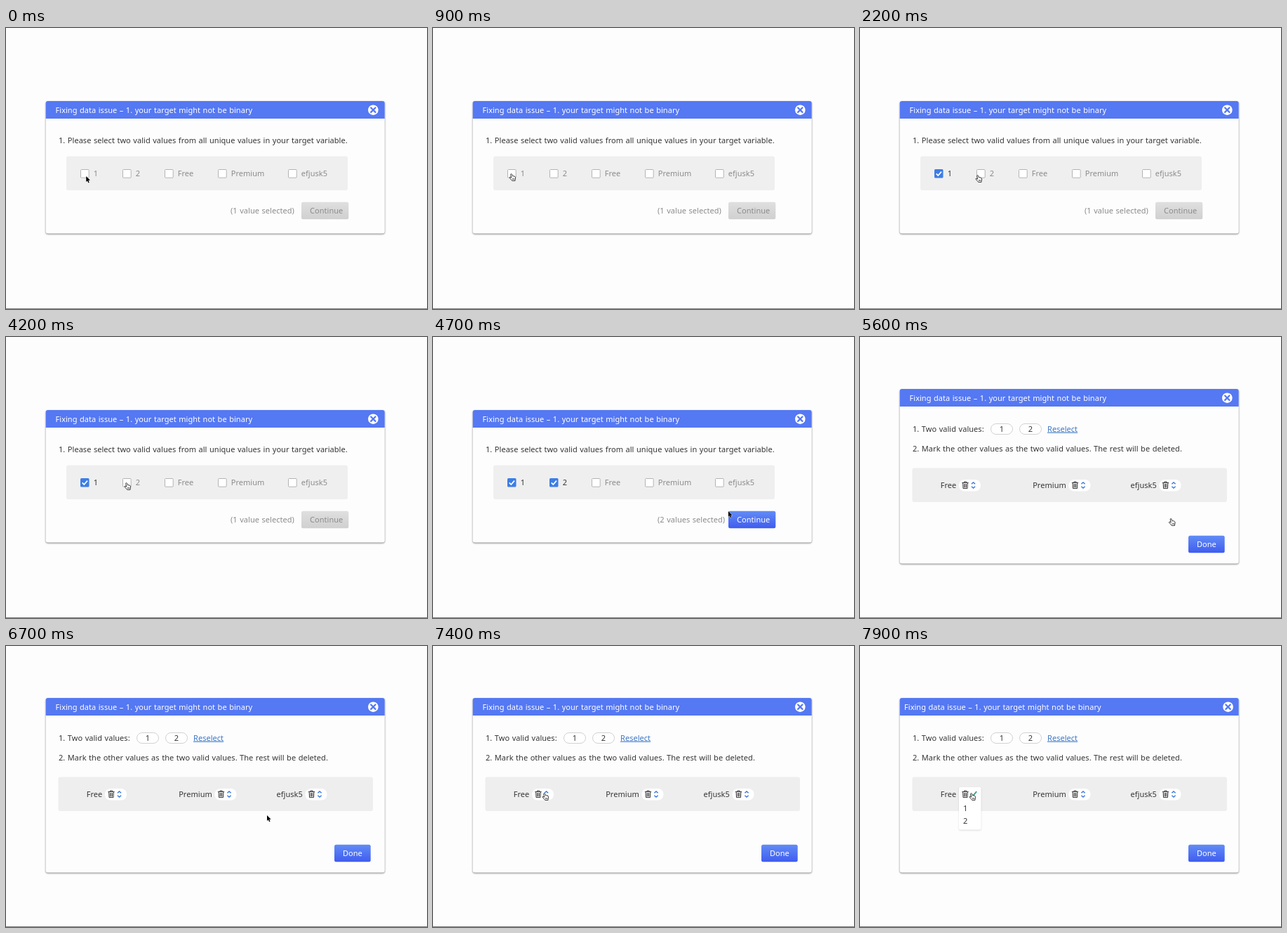
Animation, 600 px wide and 400 px high, one loop 8 s. Source, as an HTML page:

```html
<!DOCTYPE html>
<html lang="en">
<head>
<meta charset="utf-8">
<title>Fixing a data issue</title>
<style>
  html, body { margin: 0; width: 100%; height: 100%; overflow: hidden; background: #fdfdfd; }
  svg { display: block; width: 600px; height: 400px; }
  text { font: 11px "Noto Sans", "Open Sans", sans-serif; letter-spacing: .04px; word-spacing: .6px; white-space: pre; }
  .shadow { filter: drop-shadow(0 1px 1.2px rgba(0, 0, 0, .5)); }
  .soft { filter: drop-shadow(0 1px 1px rgba(0, 0, 0, .14)); }
</style>
</head>
<body>
<svg viewBox="0 0 600 400">
  <defs>
    <linearGradient id="active" x2="0" y2="1">
      <stop stop-color="#628cf6"/><stop offset="1" stop-color="#3f5cef"/>
    </linearGradient>
    <linearGradient id="disabled" x2="0" y2="1">
      <stop stop-color="#dfdfdf"/><stop offset="1" stop-color="#d0d0d0"/>
    </linearGradient>
    <g id="trash" fill="none" stroke="#3a3a3a">
      <path d="M-4.6 -3.5H4.6M-1.6 -3.7V-5H1.6V-3.7M-3.4 -3.3L-3 4.6H3L3.4 -3.3"/>
      <path d="M-1.5 -2V3.4M0 -2V3.4M1.5 -2V3.4" stroke-width=".9"/>
    </g>
    <path id="chevrons" d="M-2.6 -1.7L0 -4L2.6 -1.7M-2.6 1.7L0 4L2.6 1.7" fill="none" stroke="#3b78e0" stroke-width="1.4"/>
    <path id="arrow" d="M0 0V8L1.8 6.3L3.1 9.3L4.5 8.7L3.2 5.8L5.7 5.7Z" fill="#000" stroke="#fff" stroke-width=".8" paint-order="stroke"/>
    <g id="hand" stroke="#222" stroke-width=".9" stroke-linejoin="round">
      <path d="M-1.4 .2Q-.5 -1 .5 .2L1.5 2.9L2.8 2.7L4.1 3.1L5.2 3.9Q6 5.8 5.2 7.4L5 9.4H.7L-.8 7.4L-3 5.3Q-3.2 4 -1.9 4.2L-.3 5.2Z" fill="#fff"/>
      <path d="M1.5 6V8M2.7 6V8M3.9 6V8" stroke-width=".6"/>
    </g>
  </defs>
  <g id="scene"></g>
</svg>
<script>
const scene = document.getElementById('scene');
const LOOP = 8000, STEP = 100;
const FIRST_CHECK = 1200, SECOND_CHECK = 4300, NEXT_SCREEN = 5600, MENU_OPEN = 7900;
const DARK = '#353535', GREY = '#8b8b8b', BLUE = '#5578f3';
const TITLE = 'Fixing data issue – 1. your target might not be binary';
const CHOICES = [['1', 106], ['2', 166], ['Free', 226], ['Premium', 302], ['efjusk5', 402]];
const PICKERS = [['Free', 150], ['Premium', 306.5], ['efjusk5', 435.5]];

// The pointer rests between glides, each eased out towards its end
const ENTRY = { x: 117, y: 215 };
const GLIDES = [
  { from: -100, to: 200, x: 112, y: 208 },
  { from: 1500, to: 2200, x: 168, y: 210 },
  { from: 3200, to: 3400, x: 172, y: 208 },
  { from: 4500, to: 4800, x: 452, y: 253 },
  { from: 4900, to: 5400, x: 443.5, y: 259 },
  { from: 6600, to: 6700, x: 372, y: 241 },
  { from: 6700, to: 6900, x: 210, y: 237 },
  { from: 7000, to: 7400, x: 159, y: 210 }
];

function pointerAt(t) {
  let { x, y } = ENTRY;
  for (const glide of GLIDES) {
    const left = 1 - Math.min(1, Math.max(0, (t - glide.from) / (glide.to - glide.from)));
    const k = 1 - left * left;
    x += (glide.x - x) * k;
    y += (glide.y - y) * k;
  }
  return { x, y };
}

const inside = (p, x, y, w, h) => p.x >= x && p.x <= x + w && p.y >= y && p.y <= y + h;

// The pointer's shape follows what it was over one step earlier
function pointerShape(t) {
  const p = pointerAt(t - STEP);
  const hovering = t - STEP < NEXT_SCREEN
    ? CHOICES.some(([, x]) => inside(p, x, 201, 13, 13)) || inside(p, 421, 248, 67, 24)
    : PICKERS.some(([, x]) => inside(p, x - 9, 203, 31, 17));
  return hovering ? 'hand' : 'arrow';
}

const text = (str, x, y, fill = DARK, extra = '') => `<text x="${x}" y="${y}" fill="${fill}" ${extra}>${str}</text>`;
const box = (x, y, w, h, r, fill, extra = '') =>
  `<rect x="${x}" y="${y}" width="${w}" height="${h}" rx="${r}" fill="${fill}" ${extra}/>`;
const use = (id, x, y) => `<use href="#${id}" x="${x}" y="${y}"/>`;

function dialog(top, height, shift = 0) {
  const x = 523.3 + shift / 6, y = top + 12.7;
  return box(56.7, top, 483, height, 3, '#fdfdfd', 'class="shadow"') +
    `<path d="M56.7 ${top + 25}v-22q0 -3 3 -3h477q3 0 3 3v22Z" fill="${BLUE}"/>` +
    text(TITLE, 70.5 - shift, top + 17, '#fff') +
    `<circle cx="${x}" cy="${y}" r="7.3" fill="#fff"/>` +
    `<path d="M${x - 3.2} ${y - 3.2}l6.4 6.4m0 -6.4l-6.4 6.4" stroke="${BLUE}" stroke-width="2.2" stroke-linecap="round"/>`;
}

function button(label, x, y, width, enabled) {
  return box(x, y, width, 24.5, 2.5, `url(#${enabled ? 'active' : 'disabled'})`) +
    text(label, x + 12, y + 16.3, enabled ? '#fff' : GREY);
}

function choice(label, x, checked) {
  const mark = checked
    ? box(x, 201, 12.5, 12.5, 1.5, '#3d7de6') +
      `<path d="M${x + 2.7} 207.3l2.6 2.7l4.7 -5.4" fill="none" stroke="#fff" stroke-width="1.7"/>`
    : box(x + .5, 201.5, 11.7, 11.7, 1, '#fff', 'stroke="#b4b4b4"');
  return mark + text(label, x + 18.7, 211, checked ? DARK : GREY);
}

function selectScreen(t) {
  const both = t >= SECOND_CHECK;
  const checked = [t >= FIRST_CHECK, both];
  return dialog(104, 188.5) +
    text('1. Please select two valid values from all unique values in your target variable.', 75, 164) +
    box(86, 182.5, 401, 48.5, 3, '#efefef') +
    CHOICES.map(([label, x], i) => choice(label, x, checked[i])).join('') +
    text(both ? '(2 values selected)' : '(1 value selected)', 320, 264, GREY) +
    button('Continue', 421, 247.8, 67.3, both);
}

function valuePill(value, x) {
  return box(x + .5, 123.5, 31, 15, 7.5, '#fff', 'stroke="#d2d2d2"') +
    text(value, x + 16, 135, DARK, 'text-anchor="middle"');
}

function picker(label, x) {
  return text(label, x - 12.7, 215, DARK, 'text-anchor="end"') + box(x - 9, 203, 31, 16.5, 8, '#fff') +
    use('trash', x, 211) + use('chevrons', x + 11.5, 211);
}

function menu() {
  return box(141, 201, 31.5, 60.5, 2, '#fff', 'class="soft"') + use('trash', 150, 211) +
    '<path d="M157.5 211.5l2.7 2.7l6 -7" fill="none" stroke="#35a67c" stroke-width="1.8"/>' +
    text('1', 147, 234.5) + text('2', 147, 252.5);
}

function markScreen(t) {
  const open = t >= MENU_OPEN;
  return dialog(74, 248.5, open ? 7.5 : 0) +
    text('1. Two valid values:', 75, 134.6) + valuePill('1', 186) + valuePill('2', 227) +
    text('Reselect', 267, 134.6, '#3e78c6', 'text-decoration="underline"') +
    text('2. Mark the other values as the two valid values. The rest will be deleted.', 75, 163) +
    box(74.5, 186.5, 448.5, 48.5, 3, '#eeeeee') +
    PICKERS.map(item => picker(...item)).join('') +
    (open ? menu() : '') +
    button('Done', 468, 282.8, 51.7, true);
}

function draw(t) {
  const { x, y } = pointerAt(t);
  scene.innerHTML = box(0, 399, 600, 1, 0, '#808080') +
    (t < NEXT_SCREEN ? selectScreen(t) : markScreen(t)) + use(pointerShape(t), x, y);
}

const start = performance.now();
let shown = -1;
function tick() {
  const elapsed = Math.max(0, performance.now() - start) % LOOP;
  const t = Math.floor(elapsed / STEP) * STEP;
  if (t !== shown) draw(shown = t);
  requestAnimationFrame(tick);
}
tick();
</script>
</body>
</html>
```
